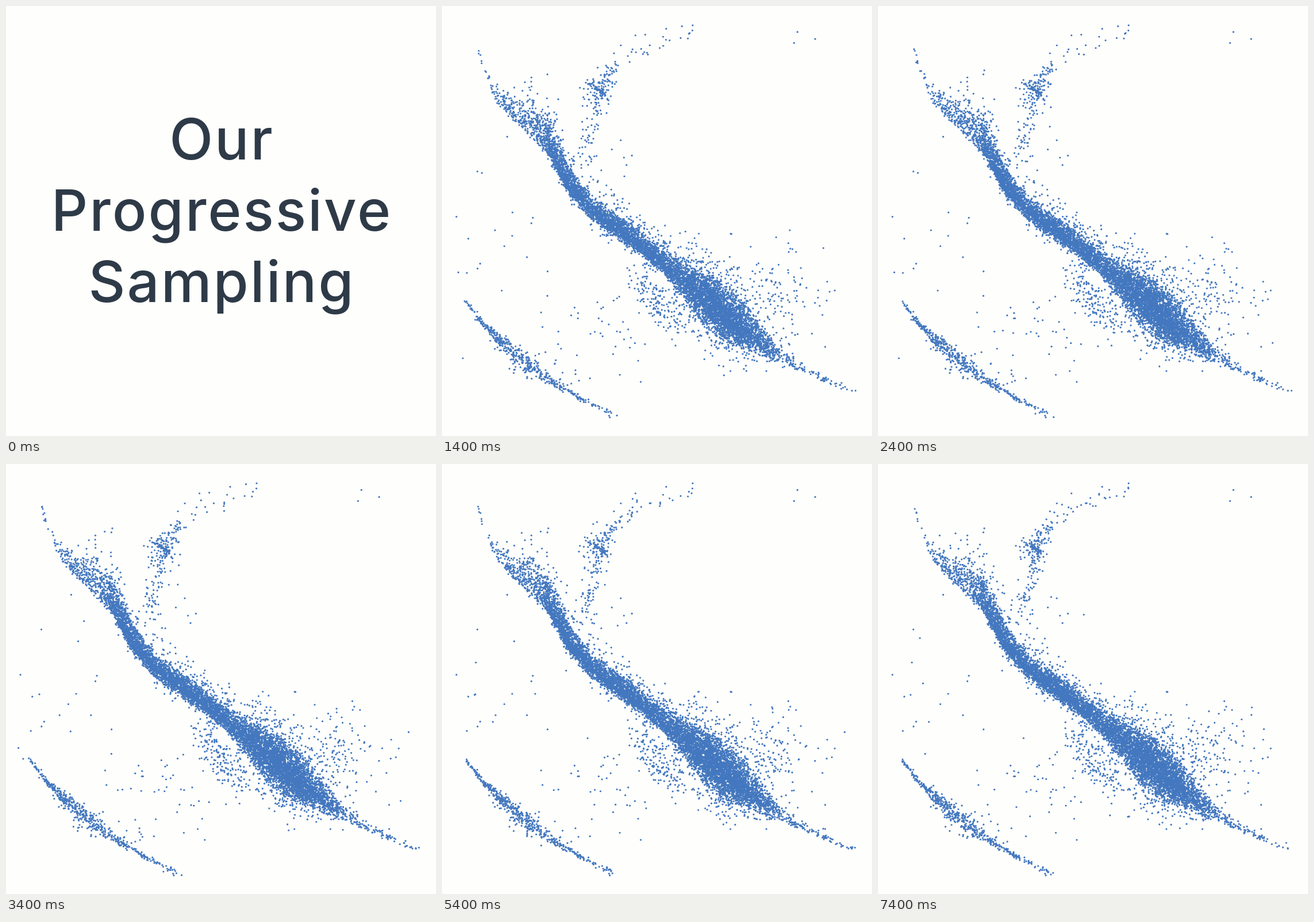
Recreate the animation shown at these times as an HTML page with a canvas. Size 748x748 px, loop 7900 ms.

```html
<!DOCTYPE html>
<html lang="en">
<head>
<meta charset="utf-8">
<title>Progressive Sampling</title>
<style>
html, body { margin: 0; width: 100%; height: 100%; overflow: hidden; background: #fefefc; }
canvas { display: block; width: 748px; height: 748px; }
</style>
</head>
<body>
<canvas id="stage" width="748" height="748"></canvas>
<script>
const SIZE = 748, LOOP = 7900, INTRO = 900, STEP = 500;
const ctx = document.getElementById('stage').getContext('2d');

function random(seed) {
  let a = Math.imul(seed + 1, 0x9e3779b1);
  return () => {
    a = (a + 0x6d2b79f5) | 0;
    let v = Math.imul(a ^ (a >>> 15), a | 1);
    v ^= v + Math.imul(v ^ (v >>> 7), v | 61);
    return ((v ^ (v >>> 14)) >>> 0) / 4294967296;
  };
}

const lerp = (a, b, k) => a + (b - a) * k;
const bump = (x, center, width) => Math.exp(-(((x - center) / width) ** 2));
const gauss = rnd =>
  Math.sqrt(-2 * Math.log(1 - rnd() * 0.99)) * Math.cos(rnd() * Math.PI * 2);

function heightAt(path, x) {
  const last = path.length - 2;
  let i = 0;
  while (i < last && x > path[i + 1][0]) i++;
  const [a, b] = [path[i], path[i + 1]];
  return lerp(a[1], b[1], (x - a[0]) / (b[0] - a[0]));
}

const slots = [];

function addSlots(count, place) {
  for (let i = 0; i < count; i++) {
    const id = slots.length, rnd = random(id);
    slots.push({
      id, place,
      steady: rnd() < 0.62,
      phase: rnd(),
      born: rnd() < 0.92 ? 0 : rnd() * 6
    });
  }
}

// A band follows a path, thinning out by up(x) above it and down(x) below it
function addBand({ path, up, down }, count, center, deviation) {
  const left = path[0][0], right = path[path.length - 1][0];
  addSlots(count, rnd => {
    let x;
    do x = center + deviation * gauss(rnd); while (x < left || x > right);
    const u = up(x), d = down(x);
    const reach = rnd() < 0.8 ? 1 - Math.sqrt(rnd()) : Math.abs(gauss(rnd)) * 0.8;
    return [x, heightAt(path, x) + (rnd() * (u + d) < u ? -u : d) * reach];
  });
}

function addCloud(count, cx, cy, dx, dy) {
  addSlots(count, rnd => [cx + dx * gauss(rnd), cy + dy * gauss(rnd)]);
}

// A trail gets sparser towards its end when bias is above 1
function addTrail(count, path, spread, bias) {
  addSlots(count, rnd => {
    const t = rnd() ** bias * (path.length - 1), i = Math.floor(t);
    return [0, 1].map(n =>
      lerp(path[i][n], path[i + 1][n], t - i) + spread * gauss(rnd));
  });
}

const mainBand = {
  path: [
    [62, 82], [96, 166], [150, 220], [182, 250], [220, 316], [260, 358],
    [350, 425], [440, 496], [500, 546], [570, 602], [640, 639], [726, 673]
  ],
  up: x => 6 + 55 * bump(x, 165, 60) + 24 * bump(x, 320, 150) + 45 * bump(x, 500, 90),
  down: x => 7 + 9 * bump(x, 270, 75) + 42 * bump(x, 472, 75)
};
addBand(mainBand, 4100, 480, 48);
addBand(mainBand, 3100, 310, 75);
addBand(mainBand, 800, 207, 22);
addBand(mainBand, 280, 140, 34);
addBand(mainBand, 120, 620, 55);

const lowBand = {
  path: [[38, 510], [72, 552], [130, 604], [190, 654], [250, 688], [310, 714]],
  up: x => 4 + 12 * bump(x, 155, 50),
  down: x => 5 + 20 * bump(x, 130, 45)
};
addBand(lowBand, 440, 125, 50);
addBand(lowBand, 70, 250, 35);

const underside = {
  path: [[322, 445], [375, 520], [450, 570]],
  up: () => 50,
  down: () => 45
};
addBand(underside, 180, 375, 32);

addTrail(150, [[250, 264], [260, 215], [268, 160], [280, 135], [295, 105], [345, 76], [440, 42]], 8, 1.3);
addTrail(45, [[256, 137], [286, 153]], 3, 1);
addCloud(60, 272, 150, 15, 19);

// Stray dots around the bands
addCloud(210, 560, 515, 52, 42);
addCloud(45, 280, 555, 48, 42);
addCloud(18, 205, 630, 35, 22);
addCloud(22, 110, 390, 60, 90);
addCloud(14, 285, 270, 25, 40);
addCloud(5, 480, 60, 90, 18);

function dot(x, y) {
  ctx.beginPath();
  ctx.arc(x, y, 1.6, 0, Math.PI * 2);
  ctx.fill();
}

function drawPlot(step) {
  ctx.fillStyle = '#4478bf';
  for (const s of slots) {
    if (s.born > step) continue;
    // Some samples are redrawn now and then as the set is refined
    const round = s.steady ? 0 : Math.floor(step / 5 + s.phase);
    dot(...s.place(random(s.id + 20011 * (round + 1))));
  }
}

function drawTitle() {
  const gap = 3;
  ctx.fillStyle = '#2e3a47';
  ctx.font = '500 99px Montserrat, Inter, sans-serif';
  ctx.letterSpacing = gap + 'px';
  ctx.textAlign = 'center';
  ctx.textBaseline = 'alphabetic';
  ['Our', 'Progressive', 'Sampling'].forEach((line, i) =>
    ctx.fillText(line, 374 + gap / 2, 267 + i * 124));
}

let shown = null;

function tick(now) {
  const scene = Math.max(Math.floor((now % LOOP - INTRO) / STEP), -1);
  if (scene !== shown) {
    shown = scene;
    ctx.fillStyle = '#fefefc';
    ctx.fillRect(0, 0, SIZE, SIZE);
    if (scene < 0) drawTitle();
    else drawPlot(scene);
  }
  requestAnimationFrame(tick);
}

tick(0);
</script>
</body>
</html>
```
